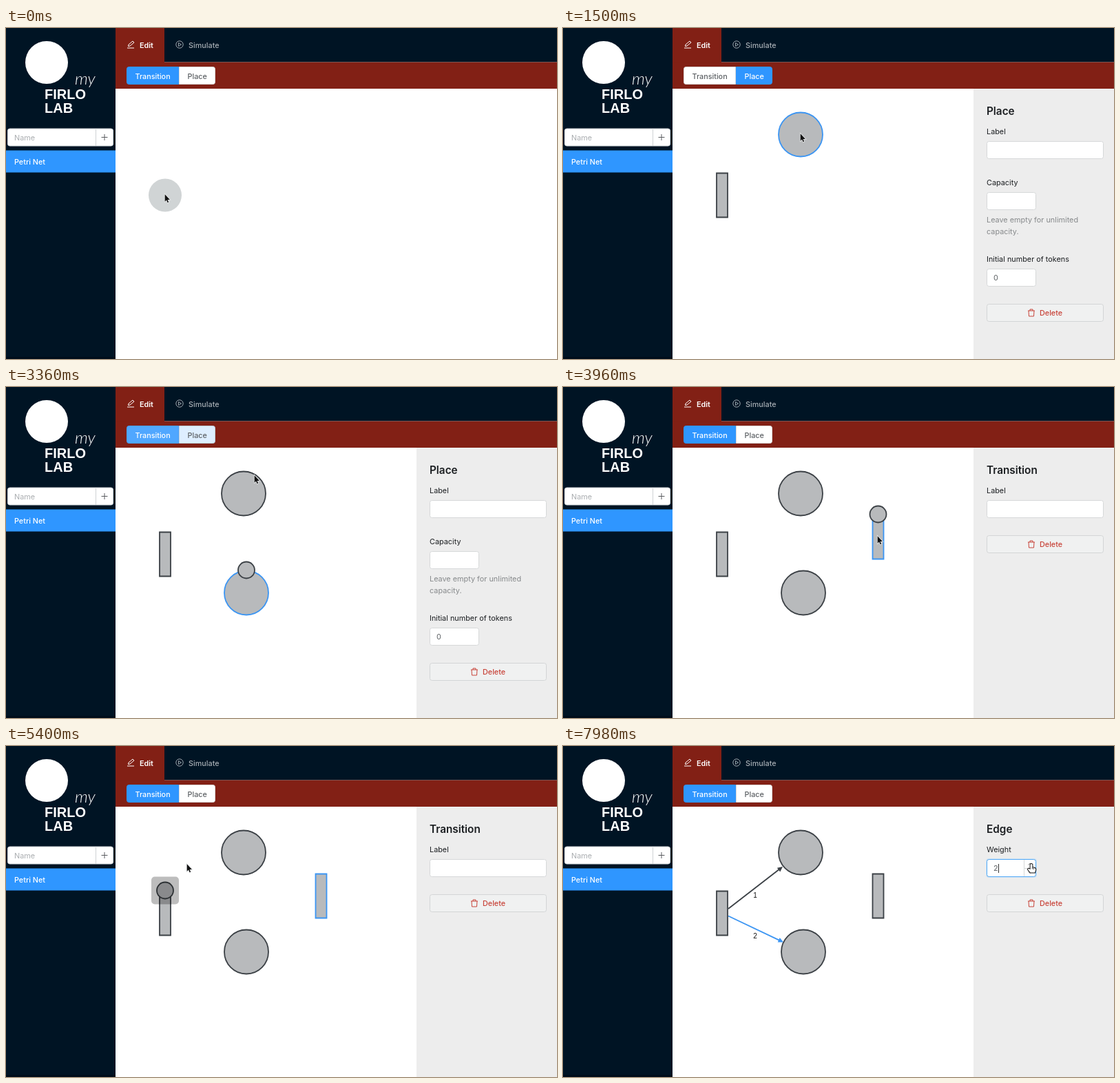
These frames come from a looping animation (800x480 px, 8 s). An HTML page with a canvas:

```html
<!DOCTYPE html>
<html lang="en">
<head>
<meta charset="utf-8">
<title>Net editor</title>
<style>
  html, body { margin: 0; width: 100%; height: 100%; overflow: hidden; background: #fff; }
  canvas { display: block; }
</style>
</head>
<body>
<canvas id="stage" width="800" height="480"></canvas>
<script>
const ctx = document.getElementById('stage').getContext('2d');
const LOOP = 8000, STEP = 60;
const UI = 'Inter, "Open Sans", sans-serif';
const BLUE = '#2f96ff', NAVY = '#001424', RED = '#822015', INK = '#1b1e21';
const LINE = '#3b4045', FILL = '#b8babc', PICKED = '#3b95f3';

// Pointer path: time, x, y; equal neighbours are pauses.
const path = [
  [0, 231, 241], [120, 231, 241], [600, 278, 68], [840, 278, 68],
  [1320, 345, 153], [1560, 345, 153], [2160, 349, 296], [2400, 349, 296],
  [2880, 214, 68], [3180, 214, 68], [3360, 361, 128], [3720, 457, 216],
  [3960, 457, 216], [4440, 326, 167], [4860, 231, 208], [5100, 231, 208],
  [5400, 263, 171], [5640, 338, 158], [5820, 338, 158], [6300, 231, 208],
  [6480, 231, 208], [6660, 254, 222], [7020, 340, 294], [7140, 340, 294],
  [7620, 680, 171], [8000, 680, 171]
];

const nodes = {
  t1: { x: 231, y: 242.5, from: 120, until: 1380 },
  p1: { x: 345, y: 154.5, from: 1380, until: 2280, round: true },
  p2: { x: 349, y: 298.5, from: 2280, until: 3840, round: true },
  t2: { x: 457.5, y: 217.5, from: 3840, until: 5700 }
};
const edges = [
  { a: [240, 236], b: [319, 175], label: [279, 220], from: 5700, until: 7020 },
  { a: [240, 246.5], b: [320, 284.5], label: [279, 279], from: 7020, until: LOOP }
];
const hovers = [
  ['t1', 180, 1380], ['p1', 1560, 2280], ['p2', 2400, 3840], ['t2', 3960, 4320],
  ['p1', 4320, 4800], ['t1', 4800, 5700], ['t1', 6240, 7020]
];
const presses = [['t1', 0, 120], ['p1', 1320, 1380], ['p2', 2220, 2280], ['t2', 3780, 3840]];
const drags = [[5100, 5700], [6480, 7020]];
const panels = [[5700, 'Edge'], [3840, 'Transition'], [1380, 'Place'], [120, 'Transition']];
const PLACE_AT = 840, TRANSITION_AT = 3180, WEIGHT_AT = 7740;

const within = (t, a, b) => t >= a && t < b;
const clamp = v => Math.max(0, Math.min(1, v));
const easeOut = v => 1 - (1 - v) ** 2;

function slope(i, axis) {
  const prev = path[i - 1], key = path[i], next = path[i + 1];
  const same = k => k[1] === key[1] && k[2] === key[2];
  if (!prev || !next || same(prev) || same(next)) return 0;
  return (next[axis] - prev[axis]) / (next[0] - prev[0]);
}

function pointerAt(t) {
  let i = 0;
  while (i < path.length - 2 && t >= path[i + 1][0]) i++;
  const a = path[i], b = path[i + 1], span = b[0] - a[0];
  const u = (t - a[0]) / span, u2 = u * u, u3 = u2 * u;
  return [1, 2].map(k =>
    (2 * u3 - 3 * u2 + 1) * a[k] + (u3 - 2 * u2 + u) * span * slope(i, k) +
    (3 * u2 - 2 * u3) * b[k] + (u3 - u2) * span * slope(i + 1, k));
}

function mix(a, b, k) {
  return `rgb(${a.map((v, i) => Math.round(v + (b[i] - v) * k)).join(',')})`;
}

function rect(x, y, w, h, fill) {
  ctx.fillStyle = fill;
  ctx.fillRect(x, y, w, h);
}

function paint(fill, stroke, width) {
  if (fill) { ctx.fillStyle = fill; ctx.fill(); }
  if (stroke) { ctx.strokeStyle = stroke; ctx.lineWidth = width; ctx.stroke(); }
}

function box(x, y, w, h, r, fill, stroke) {
  ctx.beginPath();
  ctx.roundRect(x, y, w, h, r);
  paint(fill, stroke, 1);
}

function disc(x, y, r, fill, stroke, width = 1.8) {
  ctx.beginPath();
  ctx.arc(x, y, r, 0, 7);
  paint(fill, stroke, width);
}

function text(str, x, y, color, size = 10.85, weight = 400, family = UI) {
  ctx.font = `${weight} ${size}px ${family}`;
  ctx.fillStyle = color;
  ctx.fillText(str, x, y);
}

function shape(d, x, y, fill, stroke, width = 1) {
  const p = new Path2D(d);
  ctx.save();
  ctx.translate(x, y);
  if (stroke) { ctx.strokeStyle = stroke; ctx.lineWidth = width; ctx.stroke(p); }
  if (fill) { ctx.fillStyle = fill; ctx.fill(p); }
  ctx.restore();
}

function drawSidebar() {
  rect(0, 0, 159, 480, NAVY);
  rect(0, 477, 159, 3, '#000d1a');
  disc(59, 50, 31, '#fff');
  text('my', 100, 82, '#fff', 24, 'italic 300', 'Lato, sans-serif');
  text('FIRLO', 56, 103, '#fff', 20, 700, '"Liberation Sans", sans-serif');
  text('LAB', 56, 123, '#fff', 20, 700, '"Liberation Sans", sans-serif');
  box(2.5, 146, 153, 25, 3, '#fff', '#d5d8da');
  rect(130, 147, 1, 24, '#d0d3d5');
  text('Name', 12, 163, '#aaadb0');
  shape('M-4.5 0H4.5M0 -4.5V4.5', 143, 158.5, null, '#5a5d60');
  rect(0, 177.5, 159, 32, BLUE);
  text('Petri Net', 12, 198, '#fff', 10.8, 500);
}

function drawButton(label, x, w, radii, on) {
  const white = [255, 255, 255], blue = [47, 150, 255];
  const border = mix([217, 217, 217], blue, on);
  box(x + .5, 56.5, w - 1, 25, radii, mix(white, blue, on), border);
  text(label, x + 12.5, 73.5, on > .5 ? '#fff' : '#5c6064', 10.8, 500);
}

function drawHeader(t) {
  rect(159, 0, 641, 49.5, NAVY);
  rect(159, 0, 71, 50, RED);
  rect(159, 49.5, 641, 38.5, RED);
  shape('M-3.5 2.5L-3 0L3 -5L5 -3L-1 2L-3.5 2.5M-5 5H5', 181, 24, null, '#fff');
  text('Edit', 194, 28.5, '#fff', 10.8, 600);
  disc(252, 24, 5.2, null, '#9aa3aa', 1);
  shape('M-1.5 -2.5L2.5 0L-1.5 2.5Z', 252, 24, null, '#9aa3aa');
  text('Simulate', 265, 28.5, '#a6adb3', 10.8, 500);

  const fade = from => easeOut(clamp((t - from) / 300));
  const place = fade(PLACE_AT) - fade(TRANSITION_AT);
  drawButton('Transition', 175, 76, [3, 0, 0, 3], 1 - place);
  drawButton('Place', 251, 53, [0, 3, 3, 0], place);
}

function drawField(x, y, w, value = '') {
  box(x + .5, y + .5, w - 1, 25, 3, '#fff', '#d6d8d9');
  text(value, x + 10, y + 17, '#5c6063');
}

function drawDelete(y) {
  const red = '#c8443a';
  box(615.5, y + .5, 169, 25, 3, '#f0f1f1', '#d3d5d6');
  shape('M-5 -3H5M-2 -3V-5H2V-3M-4 -3L-3.5 5H3.5L4 -3', 680, y + 13, null, red);
  text('Delete', 692, y + 17, red, 10.8, 500);
}

function drawWeight(t) {
  const hover = t >= 7560, focus = t >= WEIGHT_AT - 60;
  if (focus) box(614, 163, 74, 28, 4, '#d3e5f5');
  drawField(615, 164, 72, t >= WEIGHT_AT ? '2' : '1');
  if (hover) {
    rect(669, 165, 1, 24, '#d6d8d9');
    rect(669, 177, 17, 1, '#d6d8d9');
    shape('M-2.5 1.5L0 -1L2.5 1.5M-2.5 11L0 13.5L2.5 11', 678, 171, null, '#888');
  }
  if (focus) {
    box(615.5, 164.5, 71, 25, 3, null, '#55aaf5');
    rect(632, 171, 1, 13, '#333');
  }
}

function drawPanel(t) {
  const panel = panels.find(p => t >= p[0]);
  if (!panel) return;
  const kind = panel[1];
  rect(596, 88, 204, 392, '#ededed');
  text(kind, 615, 126, INK, 15.3, 600);
  text(kind === 'Edge' ? 'Weight' : 'Label', 615, 153.5, INK);
  if (kind === 'Edge') drawWeight(t);
  else drawField(615, 164, 170);
  if (kind !== 'Place') return drawDelete(215);
  text('Capacity', 615, 228, INK);
  drawField(615, 238, 72);
  text('Leave empty for unlimited', 615, 281.5, '#86898b');
  text('capacity.', 615, 299, '#86898b');
  text('Initial number of tokens', 615, 338.5, INK);
  drawField(615, 349, 72, '0');
  drawDelete(400);
}

function drawEdge(e, t) {
  const color = t < e.until ? PICKED : LINE;
  const [x, y] = e.b, angle = Math.atan2(y - e.a[1], x - e.a[0]);
  ctx.beginPath();
  ctx.moveTo(...e.a);
  ctx.lineTo(x - 5 * Math.cos(angle), y - 5 * Math.sin(angle));
  paint(null, color, 1.8);
  ctx.save();
  ctx.translate(x, y);
  ctx.rotate(angle);
  shape('M0 0L-7.5 -3.6V3.6Z', 0, 0, color);
  ctx.restore();
  ctx.textAlign = 'center';
  const label = e === edges[1] && t >= WEIGHT_AT ? '2' : '1';
  text(label, ...e.label, '#111', 10, 400, '"Liberation Sans", sans-serif');
  ctx.textAlign = 'left';
}

function drawNet(t) {
  for (const [id, a, b] of presses)
    if (within(t, a, b)) disc(nodes[id].x, nodes[id].y, 24, '#d0d4d5');
  for (const e of edges) if (t >= e.from) drawEdge(e, t);
  for (const n of Object.values(nodes)) {
    if (t < n.from) continue;
    const stroke = t < n.until ? PICKED : LINE;
    if (n.round) {
      disc(n.x, n.y, 32, FILL, stroke);
    } else {
      ctx.beginPath();
      ctx.rect(n.x - 8, n.y - 32, 16, 64);
      paint(FILL, stroke, 1.8);
    }
  }
  const hover = hovers.find(h => within(t, h[1], h[2]));
  if (hover) {
    const n = nodes[hover[0]];
    disc(n.x, n.y - 33, 12, FILL, LINE);
  }
  if (drags.some(d => within(t, ...d))) box(211, 189.5, 40, 40, 5, 'rgba(0,0,0,.26)');
}

function drawPointer(t) {
  const [x, y] = pointerAt(t);
  const onButton = within(x, 175, 304) && within(y, 56, 82);
  const onStepper = within(x, 669, 687) && within(y, 164, 190);
  if (onButton || onStepper) {
    shape('M-1.4 .8Q0 -1 1.4 .8V5L5 6Q6.6 6.6 6.2 9L5 12.5H-1.5L-5 8Q-4.6 6 -2.8 7.2L-1.4 8Z',
      x, y, '#fff', '#111', 2);
    shape('M1.4 5V7.5M3.4 5.8V8', x, y, null, '#111', .8);
  } else {
    shape('M0 0V10.4L2.3 8.3L3.9 12L5.4 11.3L3.9 7.7H7.2Z', x - .3, y + .3, '#111', '#e6e8e9', 1.6);
  }
}

const start = performance.now();

function draw(now) {
  const t = Math.floor((Math.max(0, now - start) % LOOP) / STEP) * STEP;
  rect(0, 0, 800, 480, '#fff');
  drawSidebar();
  drawHeader(t);
  drawNet(t);
  drawPanel(t);
  drawPointer(t);
  requestAnimationFrame(draw);
}

requestAnimationFrame(draw);
</script>
</body>
</html>
```
